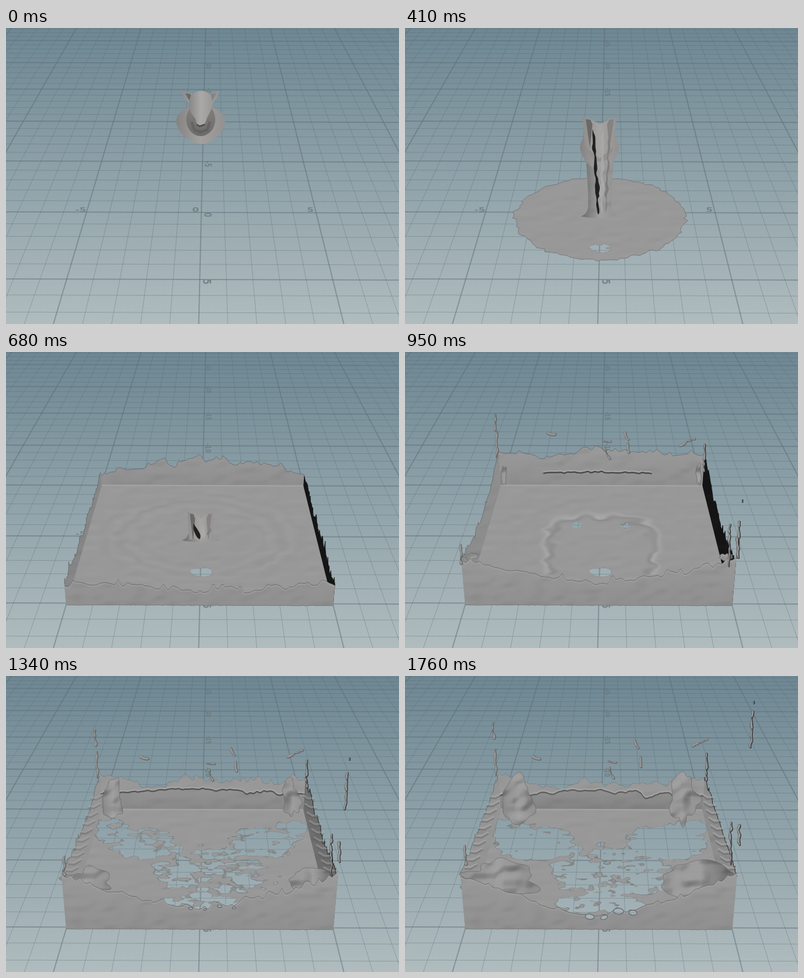
Animation, 678 px wide and 512 px high, one loop 1780 ms. Source, as an HTML page with a canvas:

```html
<!DOCTYPE html>
<html lang="en">
<head>
<meta charset="utf-8">
<title>Pouring fluid</title>
<style>
html, body { margin: 0; width: 100%; height: 100%; overflow: hidden; background: #8fa1a9; }
canvas { display: block; width: 678px; height: 512px; }
</style>
</head>
<body>
<canvas id="stage" width="678" height="512"></canvas>
<script>
const W = 678, H = 512, LOOP = 1780, MID = 337;
const ctx = document.getElementById('stage').getContext('2d');
const lerp = (a, b, f) => a + (b - a) * f;
const clamp = (v, a = 0, b = 1) => Math.min(b, Math.max(a, v));
const ramp = (n, from, to) => clamp((n - from) / (to - from));
const easeOut = f => 1 - (1 - f) ** 2;
const grey = (v, a = 1) => `rgba(${v},${v},${v},${a})`;
const layer = (w, h) => Object.assign(document.createElement('canvas'), { width: w, height: h });

// Seeded value noise, 0 to 1
const hash = (i, j) => { const s = Math.sin(i * 127.1 + j * 311.7) * 43758.5453; return s - Math.floor(s); };
function noise(x, y) {
  const i = Math.floor(x), j = Math.floor(y);
  let u = x - i, v = y - j;
  u *= u * (3 - 2 * u); v *= v * (3 - 2 * v);
  return lerp(lerp(hash(i, j), hash(i + 1, j), u), lerp(hash(i, j + 1), hash(i + 1, j + 1), u), v);
}

// Runs of even steps: first change, last change, count
const RUNS = [[20, 520, 25], [570, 1030, 14], [1100, 1600, 9], [1680, 1760, 2]];
function stepAt(t) {
  return RUNS.reduce((n, [a, b, count]) =>
    t < a ? n : n + Math.min(count, 1 + Math.floor((t - a) / (b - a) * (count - 1) + 0.3)), 0);
}

// Ground plane to screen, and raising a screen point
function ground(x, z) {
  const s = 36.4 / (36.4 - z), px = 354 + (39.6 * x - 17) * s;
  return [px, 728 * s - 409 + (px - MID) * 0.003];
}
const lift = ([x, y], h) => [x + (x - MID) * h / 2700, y - h];

function trace(c, pts, close) {
  c.beginPath();
  pts.forEach(p => c.lineTo(p[0], p[1]));
  if (close) c.closePath();
}
function line(c, pts, color, width) {
  trace(c, pts);
  c.strokeStyle = color; c.lineWidth = width;
  c.stroke();
}
function gradient(x1, y1, x2, y2, ...colors) {
  const g = ctx.createLinearGradient(x1, y1, x2, y2);
  colors.forEach((c, i) => g.addColorStop(i / (colors.length - 1), c));
  return g;
}
const down = (y1, y2, ...colors) => gradient(0, y1, 0, y2, ...colors);
const across = (x1, x2, ...colors) => gradient(x1, 0, x2, 0, ...colors);

// ---- Backdrop ----
const backdrop = layer(W, H);
(function paintBackdrop(c) {
  c.fillStyle = down(0, H, '#6e8793', '#8fa2a9', '#b0bcbe');
  c.fillRect(0, 0, W, H);
  for (const major of [false, true]) {
    const color = major ? 'rgba(92,111,120,.5)' : 'rgba(84,106,117,.38)', width = major ? 2 : 1;
    for (let i = -30; i <= 30; i++) {
      if ((i % 5 === 0) !== major) continue;
      line(c, [ground(i, -30), ground(i, 12)], color, width);
      if (i < 12) line(c, [ground(-30, i), ground(30, i)], color, width);
    }
  }
  c.fillStyle = 'rgba(108,116,117,.75)';
  c.textAlign = 'center';
  c.textBaseline = 'middle';
  const label = (text, x, y, turn) => {
    const s = (y + 409) / 728;
    c.save();
    c.translate(x, y);
    c.scale(1.3 * s, 0.85 * s);
    c.rotate(turn);
    c.font = 'bold 13px "DejaVu Sans", sans-serif';
    c.fillText(text, 0, 0);
    c.restore();
  };
  for (const v of [-5, 0, 5]) label(String(v), ground(v, 0)[0] - 10, 315, 0);
  for (let v = -25; v <= 5; v += 5) {
    const y = ground(0, v)[1] + 4;
    label(String(v), 349 - y / 110, y, Math.PI / 2);
  }
  // Faint guide around the emitter
  for (const x of [307, 368]) {
    line(c, [[x, 127], [x, 150], [x + Math.sign(x - MID) * 9, 190]], 'rgba(150,132,126,.3)', 1);
  }
  line(c, [[298, 153], [374, 153]], 'rgba(150,132,126,.3)', 1);
})(backdrop.getContext('2d'));
const through = ctx.createPattern(backdrop, 'no-repeat');

// ---- Lumpy shading, laid over plain fills ----
function lumps(sx, sy, gain) {
  const c = layer(W, H), g = c.getContext('2d'), img = g.createImageData(W, H);
  const h = Float32Array.from({ length: W * H }, (_, i) => noise(i % W / sx, Math.floor(i / W) / sy));
  for (let i = 2 * W + 2; i < W * H; i++) {
    const slope = (h[i] - h[i - 2 * W - 2]) * gain;
    img.data.fill(slope > 0 ? 215 : 20, i * 4, i * 4 + 3);
    img.data[i * 4 + 3] = 255 * clamp(slope > 0 ? slope * 0.4 : -slope, 0, 0.75);
  }
  g.putImageData(img, 0, 0);
  return ctx.createPattern(c, 'no-repeat');
}
const SOFT = lumps(22, 11, 0.28), ROUGH = lumps(17, 13, 1.5);
function fillLumpy(fill, texture) {
  ctx.fillStyle = fill;
  ctx.fill();
  ctx.fillStyle = texture;
  ctx.fill();
}

// ---- Pool surface, with thinning holes ----
const FX = 90, FY = 215, FW = 490, FH = 226, SIZE = FW * FH;
const pool = layer(FW, FH), poolCtx = pool.getContext('2d');
const image = poolCtx.createImageData(FW, FH);
const grain = new Float32Array(SIZE), relief = new Float32Array(SIZE), open = new Float32Array(SIZE);
for (let i = 0; i < SIZE; i++) {
  const x = FX + i % FW, y = FY + Math.floor(i / FW);
  grain[i] = 0.62 * noise(x / 18 + y / 40, y / 5.5) + 0.38 * noise(x / 8 + 40, y / 3.6);
  relief[i] = noise(x / 24, y / 9 + 70);
}

// Mirrored regions where the surface tears open
const TEARS = [
  { off: 0, y: 380, rx: 24, ry: 9, peak: 0.75, from: 15, to: 24, grow: 0 },
  { off: 41, y: 299, rx: 10, ry: 6, peak: 0.72, from: 32, to: 36, grow: 0 },
  { off: 82, y: 289, rx: 44, ry: 22, peak: 0.84, from: 38, to: 50, grow: 36 },
  { off: 150, y: 268, rx: 30, ry: 28, peak: 0.6, from: 38, to: 48, grow: 6 },
  { off: 0, y: 338, rx: 95, ry: 40, peak: 0.6, from: 37, to: 50, grow: 40 },
  { off: 24, y: 394, rx: 45, ry: 16, peak: 0.64, from: 38, to: 48, grow: 8 }
];
function tear(n) {
  open.fill(0);
  for (const t of TEARS) {
    const age = easeOut(ramp(n, t.from, t.to)), peak = t.peak * age;
    if (!age) continue;
    const rx = t.rx + t.grow * age, ry = t.ry + t.grow * age * 0.4;
    for (const side of t.off ? [-1, 1] : [1]) {
      const cx = MID + side * (t.off + t.grow * age * 0.85);
      for (let y = Math.max(FY, Math.floor(t.y - ry)); y < Math.min(FY + FH, t.y + ry); y++) {
        for (let x = Math.max(FX, Math.floor(cx - rx)); x < Math.min(FX + FW, cx + rx); x++) {
          const d = ((x - cx) / rx) ** 2 + ((y - t.y) / ry) ** 2, i = (y - FY) * FW + x - FX;
          open[i] = Math.max(open[i], peak * clamp(1.8 * (1 - d)));
        }
      }
    }
  }
}

function poolOutline(n) {
  const r = 0.9 + 0.46 * (n - 14), pts = [];
  for (let i = 0; i <= 150; i++) {
    const a = i / 75 * Math.PI;
    const q = r * (0.96 + 0.06 * noise(i % 150 * 0.6, 3) + 0.03 * noise(i % 150 * 1.9, n));
    pts.push(ground(clamp(q * Math.cos(a), -5, 5), clamp(q * Math.sin(a) * 0.94 + 0.2, -5, 5)));
  }
  return pts;
}

function drawPool(n) {
  if (n < 14) return;
  tear(n);
  const ripple = n > 24 ? 3 * clamp(1 - Math.abs(n - 30) / 9) : 0;
  const swell = 26 * clamp(1 - Math.abs(n - 37) / 5), front = (n - 31) / 6;
  const px = image.data;
  for (let i = 0; i < SIZE; i++) {
    const x = FX + i % FW - MID, y = FY + Math.floor(i / FW);
    const edge = grain[i] - open[i];
    let lum = 152 + (relief[i] - (relief[i - FW * 2 - 2] || 0.5)) * 11, alpha = 1;
    if (ripple) {
      const d = Math.hypot(x / 2.3, y - 322);
      if (d > 30) lum += ripple * Math.sin(d / 2.4 - n + relief[i] * 4) * clamp(1 - Math.abs(d - 60) / 30);
    }
    if (swell && y < 385) {
      const q = (((x / 92) ** 4 + ((y - 345) / 60) ** 4) ** 0.25 - front + (relief[i] - 0.5) * 0.2) * 14;
      lum += swell * q * Math.exp(-q * q) * (0.4 + relief[i]);
    }
    if (open[i] > 0.1) {
      alpha = clamp(edge * 14);
      lum -= 48 * (1 - clamp(edge / 0.13)) * (0.4 + relief[i]);
    }
    px.fill(lum, i * 4, i * 4 + 3);
    px[i * 4 + 3] = alpha * 255;
  }
  poolCtx.putImageData(image, 0, 0);
  const rim = poolOutline(n);
  ctx.save();
  trace(ctx, rim);
  ctx.clip();
  ctx.drawImage(pool, FX, FY);
  ctx.restore();
  if (n < 27) line(ctx, rim, grey(120), 1);
}

// ---- Walls of splashed fluid ----
const BL = ground(-5, -5), BR = ground(5, -5), FL = ground(-5, 5.12), FR = ground(5, 5.12);
const farCorner = n => 58 * ramp(n, 24, 37);
const nearCorner = n => 95 * ramp(n, 23, 40) ** 0.85;
const spread = u => Math.abs(2 * u - 1);

function backHeight(u, n) {
  const middle = 64 * easeOut(ramp(n, 23, 37)) - 17 * ramp(n, 37, 50);
  return lerp(middle, farCorner(n), spread(u) ** 2) - 9 * Math.sin(2 * Math.PI * u) ** 2 * ramp(n, 25, 38);
}
function frontHeight(u, n) {
  const middle = 42 * easeOut(ramp(n, 23, 37)) - 15 * ramp(n, 43, 50);
  return lerp(middle, nearCorner(n), spread(u) ** 1.5);
}
function sideHeight(u, n) {
  return lerp(farCorner(n), nearCorner(n), u) - 22 * Math.sin(Math.PI * u) * ramp(n, 26, 34) * ramp(n, 50, 37);
}

function wall(a, b, height, n, seed, jag) {
  const base = [], top = [], drift = seed + n * 0.07;
  for (let i = 0; i <= 150; i++) {
    const u = i / 150, p = [lerp(a[0], b[0], u), lerp(a[1], b[1], u)], h = height(u, n);
    const rough = (noise(i * 0.13, drift) - 0.5) * jag + (noise(i * 0.4, drift + 9) ** 3 - 0.2) * jag * 0.7;
    base.push(p);
    top.push(lift(p, Math.max(0, h + rough * clamp(h / 25))));
  }
  return { base, top };
}

function fillWall({ base, top }, fill, edge = grey(85, 0.6)) {
  trace(ctx, base.concat(top.slice().reverse()), true);
  fillLumpy(fill, SOFT);
  line(ctx, top, edge, 1);
}

function drawBack(n) {
  const w = wall(BL, BR, backHeight, n, 2, 16);
  const sag = ramp(n, 38, 50);
  fillWall(w, down(175, 230, grey(152), grey(lerp(142, 130, sag))));
  if (n > 33) {
    // Crest folding over, with drips hanging from it
    const lip = w.base.map((p, i) => lift(p, lerp(23, 38, ramp(n, 37, 43)) - 9 * sag
      - 9 * spread(i / 150) ** 2 - 20 * sag * (noise(i * 0.13, 31 + n * 0.04) ** 2 - 0.2) + 3 * noise(i * 0.4, n)));
    if (n > 38) {
      trace(ctx, w.top.concat(lip.slice().reverse()), true);
      fillLumpy(grey(152), SOFT);
    }
    const part = n > 38 ? lip : lip.slice(32, 113);
    line(ctx, part.map(p => [p[0], p[1] + 1]), grey(50, 0.75 - 0.25 * sag), 2.5);
    line(ctx, part.map(p => [p[0], p[1] - 1.5]), grey(165), 2);
  }
  line(ctx, [BL, BR], grey(165), 2);
}

function drawSides(n) {
  fillWall(wall(BL, FL, sideHeight, n, 14, 14), grey(Math.round(lerp(134, 148, ramp(n, 30, 44)))));
  const light = ramp(n, 38, 46), right = wall(BR, FR, sideHeight, n, 23, 16);
  fillWall(right, grey(Math.round(lerp(20, 140, light))), grey(25));
  for (const i of light ? [0, 1, 2, 3, 4, 5, 6, 7, 8, 9] : []) {
    // Rounded shelves along the thick rims
    const u = 0.1 + i * 0.075, h = sideHeight(u, n);
    for (const [a, b, s] of [[BL, FL, 1], [BR, FR, -1]]) {
      const [x, y] = lift([lerp(a[0], b[0], u), lerp(a[1], b[1], u)], h * 0.7);
      line(ctx, [[x - 10, y + 3 * s], [x, y + 4], [x + 12, y - 3 * s]], grey(80, 0.35 * light), 2.5);
      line(ctx, [[x - 10, y + 3 * s - 3], [x, y], [x + 12, y - 3 * s - 3]], grey(168, 0.6 * light), 3);
    }
  }
}

function drawFront(n) {
  const w = wall(FL, FR, frontHeight, n, 6, lerp(18, 13, ramp(n, 37, 50)));
  fillWall(w, down(345, 438, grey(153), grey(143)));
  line(ctx, w.top.map(p => [p[0], p[1] + 2]), grey(165, 0.5), 2);
  line(ctx, w.base.map((p, i) => [p[0], p[1] + noise(i, 1) - 0.5]), grey(119), 1);
  // Windows torn in the middle of the crest
  for (let i = 0; i < 4 && n > 42; i++) {
    const [x, y] = w.top[70 + i * 8], size = (3 + 5 * hash(i, 3)) * ramp(n, 41, 48);
    ctx.beginPath();
    ctx.ellipse(x, y + 3 + 5 * hash(i, 9), size * 1.3, size * 0.75, hash(i, 5) - 0.5, 0, 7);
    ctx.fillStyle = through;
    ctx.fill();
    ctx.strokeStyle = grey(100);
    ctx.lineWidth = 1.2;
    ctx.stroke();
  }
}

// ---- Churning corners, spreading inward ----
function drawCorner([cx, cy], near, n) {
  const grow = ramp(n, 34, 50), side = Math.sign(cx - MID);
  if (!grow) return;
  const x = cx - side * (near ? 56 : 32) * grow, y = cy - (near ? 84 : 18);
  const rx = (near ? 62 : 26) * grow, ry = near ? 32 * grow : 12 + 30 * grow, pts = [];
  for (let i = 0; i < 90; i++) {
    const a = i / 45 * Math.PI, u = Math.cos(a), v = Math.sin(a);
    const q = 0.55 + 0.8 * noise(u * 2.6 + cx, v * 2.6 + n * 0.1);
    pts.push([x + u * rx * q, y + v * ry * q]);
  }
  trace(ctx, pts, true);
  const dark = near && side > 0 ? 95 : 140;
  fillLumpy(across(x - rx, x + rx, grey(side < 0 ? 140 : 150), grey(157), grey(dark)), ROUGH);
  ctx.strokeStyle = grey(70, 0.4);
  ctx.lineWidth = 1;
  ctx.stroke();
}

// ---- Flying strands: centre at step 37, centre at step 50, length, lean ----
const STRANDS = [
  [155, 122, 153, 95, 28, 0],
  [158, 160, 157, 150, 46, 0],
  [253, 141, 227, 141, 14, 1.2],
  [349, 154, 358, 148, 14, 1.4],
  [350, 176, 357, 168, 20, 0.4],
  [383, 146, 400, 119, 14, 0.5],
  [386, 166, 406, 149, 17, 0.1],
  [487, 156, 508, 115, 28, -1.1],
  [516, 184, 520, 158, 46, 0],
  [582, 258, 602, 46, 3, 0],
  [575, 325, 598, 93, 62, -0.05],
  [560, 335, 562, 290, 72, 0],
  [574, 340, 577, 276, 34, 0],
  [97, 350, 104, 310, 32, 0]
];
function drawStrands(n) {
  if (n < 34) return;
  const f = (n - 37) / 13;
  STRANDS.forEach(([x1, y1, x2, y2, len, lean], k) => {
    const x = lerp(x1, x2, f), y = lerp(y1, y2, f), shade = x > 510 ? 45 : 95;
    for (const pass of [0, 1]) {
      ctx.fillStyle = grey(pass ? 148 : shade);
      for (let i = -len / 2; i <= len / 2; i += 1.5) {
        const sway = 5 * (noise(i / 9, k + n * 0.15) - 0.5) * clamp(len / 12);
        const r = 1.1 + 1.8 * noise(i / 5, k * 3) - pass * 0.7;
        ctx.beginPath();
        ctx.arc(x + i * Math.sin(lean) + sway * Math.cos(lean) - pass * 0.5, y + i * Math.cos(lean) - sway * Math.sin(lean) - pass * 0.4, r, 0, 7);
        ctx.fill();
      }
    }
  });
}

// ---- Falling head and its stream ----
const drop = m => m > 0 ? 2.8 * m + 0.455 * m * m : 0;

function collar(dy, k) {
  ctx.save();
  ctx.translate(335.5, 163 + dy);
  ctx.scale(k, 1);
  ctx.beginPath();
  ctx.moveTo(-42, 0);
  ctx.bezierCurveTo(-41, -20, -24, -27, 0, -27);
  ctx.bezierCurveTo(24, -27, 41, -20, 42, 0);
  ctx.bezierCurveTo(38, 20, 20, 37, 2, 37.5);
  ctx.bezierCurveTo(-20, 35, -37, 21, -42, 0);
  ctx.fillStyle = across(-42, 42, '#858382', '#a3a1a0', '#939190');
  ctx.fill();
  ctx.restore();
}

function stream(top, end, k, landed) {
  const y = 150 + top, wide = 27 * k, foot = landed ? 20 : 27;
  ctx.beginPath();
  ctx.moveTo(336 - wide, y);
  ctx.bezierCurveTo(336 - wide, y + 50, 337 - foot, end - 50, 336 - foot, end - 16);
  ctx.quadraticCurveTo(336 - foot, end, 323 - foot, end + 4);
  ctx.quadraticCurveTo(336, end + 10, 349 + foot, end + 4);
  ctx.quadraticCurveTo(336 + foot, end, 336 + foot, end - 16);
  ctx.bezierCurveTo(336 + foot, end - 50, 336 + wide, y + 50, 336 + wide, y);
  fillLumpy(across(308, 364, grey(112), grey(158), grey(146)), SOFT);
}

function head(n) {
  const sag = 36 * ramp(n, 0, 12), landed = n >= 14;
  // Neck
  ctx.beginPath();
  ctx.ellipse(0, 158, 25, 29, 0, 0, 7);
  ctx.fillStyle = down(130, 186, '#858382', n < 4 ? '#6d6b6a' : '#949291');
  ctx.fill();
  // Ears, drawn out downwards
  trace(ctx, [[-33, 109], [-17, 113], [0, 122], [16, 114], [32, 109],
    [28, 121 + sag], [21, 130 + sag], [0, 145 + sag], [-21, 130 + sag], [-29, 121 + sag]], true);
  ctx.fillStyle = across(-33, 32, '#8f8d8c', '#a6a4a3', '#959392');
  ctx.fill();
  for (const side of [-1, 1]) {
    trace(ctx, [[side * 27, 113], [side * 18, 114], [side * 14, 122], [side * 19, 127 + sag]], true);
    ctx.fillStyle = side < 0 ? '#6b6968' : '#858382';
    ctx.fill();
  }
  if (landed) return;
  ctx.beginPath();
  ctx.moveTo(-17, 117);
  ctx.bezierCurveTo(-8, 106, 10, 106, 18, 117);
  ctx.bezierCurveTo(24, 138, 15, 145, 10, 158);
  ctx.quadraticCurveTo(7, 169, 0, 170);
  ctx.quadraticCurveTo(-8, 169, -9, 157);
  ctx.bezierCurveTo(-19, 145, -25, 135, -17, 117);
  ctx.fillStyle = across(-22, 22, '#868483', '#aba9a8', '#989695');
  ctx.fill();
}

// Ragged vertical fold, tapering at both ends
function fold(x1, x2, y1, y2, color, width) {
  const left = [], right = [];
  for (let y = y1; y <= y2; y += 3) {
    const f = (y - y1) / (y2 - y1), x = lerp(x1, x2, f) + 3 * (noise(y / 9, x1) - 0.5);
    const w = width * Math.sin(Math.PI * f) ** 0.5 * (0.3 + noise(y / 11, 8));
    left.push([x - w / 2, y]);
    right.unshift([x + w / 2, y]);
  }
  trace(ctx, left.concat(right), true);
  ctx.fillStyle = color;
  ctx.fill();
}

function drawPour(n) {
  if (n > 31) return;
  const tip = drop(n), top = drop(n - 12.7), k = 1 / (1 + top * 0.0026);
  const landed = n >= 14, end = landed ? 322 : 182 + tip;
  if (!landed) collar(tip, 1 / (1 + tip * 0.0016));
  if (n > 1) stream(top, end, k, landed);
  ctx.save();
  ctx.beginPath();
  ctx.rect(0, 0, W, 324);
  ctx.clip();
  collar(top, k * k);
  ctx.translate(336, top);
  ctx.scale(k, 1);
  head(n);
  ctx.restore();
  const nose = Math.min(168 + tip, 322), brow = Math.min((landed ? 130 : 160) + top, 310);
  if (n > 2) {
    fold(landed ? 324 : 332, 334, brow, nose + 2, grey(landed ? 32 : 70), landed ? 8 : 4);
    fold(341, 339, brow, nose, grey(168), 8);
  }
  if (landed) fold(353, 346, brow + 8, nose - 4, grey(125), 5);
  else {
    if (n < 4) line(ctx, [[320, 162], [325, 176], [335, 180], [347, 176], [352, 162]], 'rgba(70,68,67,.3)', 5);
    line(ctx, [[329, nose - 1], [334, nose + 2], [343, nose - 1]], '#4a4847', 2.5);
  }
}

function draw(n) {
  ctx.drawImage(backdrop, 0, 0);
  ctx.lineJoin = 'round';
  drawPool(n);
  const splashed = n > 23;
  if (splashed) {
    drawBack(n);
    drawSides(n);
    drawCorner(BL, false, n);
    drawCorner(BR, false, n);
  }
  drawPour(n);
  if (splashed) {
    drawCorner(FL, true, n);
    drawCorner(FR, true, n);
    drawFront(n);
    drawStrands(n);
  }
}

const start = performance.now();
let shown = -1;
function tick() {
  const n = stepAt((performance.now() - start) % LOOP);
  if (n !== shown) draw(shown = n);
  requestAnimationFrame(tick);
}
tick();
</script>
</body>
</html>
```
